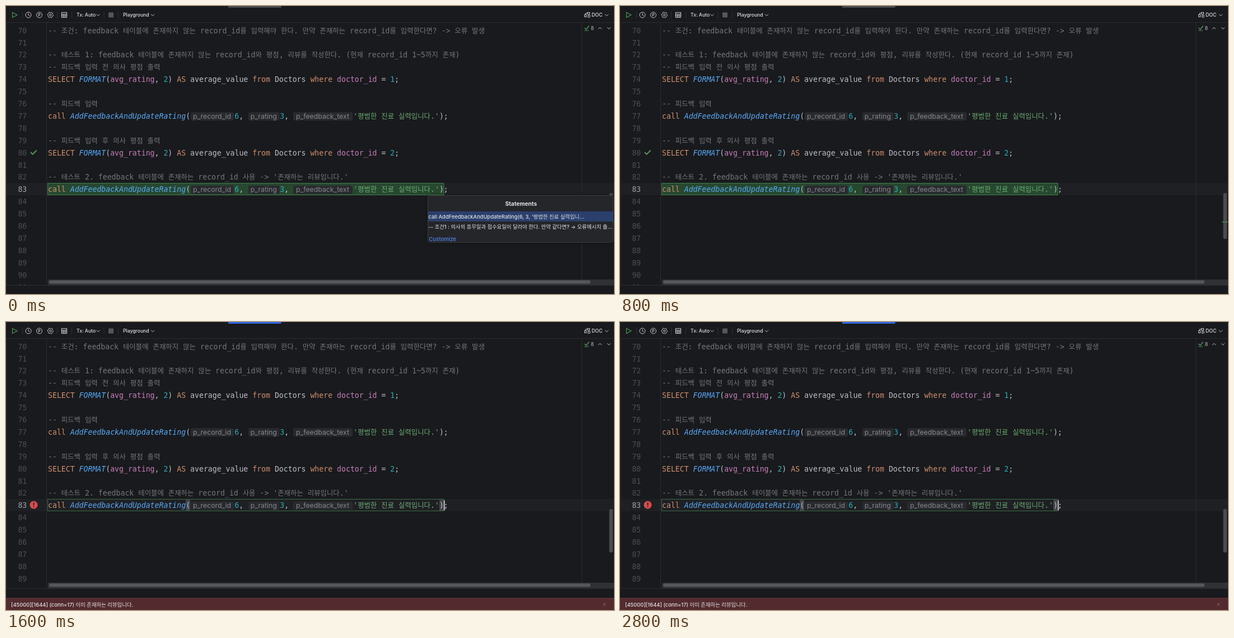
An HTML page with a canvas that plays this animation: 1086x516 px, repeating every 2880 ms.

```html
<!DOCTYPE html>
<html lang="ko">
<head>
<meta charset="utf-8">
<title>SQL editor</title>
<style>
html, body { margin: 0; width: 100%; height: 100%; overflow: hidden; background: #191a1d; }
canvas { display: block; width: 1086px; height: 516px; }
</style>
</head>
<body>
<canvas id="stage"></canvas>
<script>
const W = 1086, H = 516, LOOP = 2880;
const POPUP_END = 720, FAIL_AT = 880, BLINK = 800;
const ROW = 21.9, FIRST_Y = 44, CODE_X = 75;

const canvas = document.getElementById('stage');
const ctx = canvas.getContext('2d');
const ratio = window.devicePixelRatio || 1;
canvas.width = W * ratio;
canvas.height = H * ratio;

const MONO = '13.2px "DejaVu Sans Mono", monospace';
const HANGUL = '12.4px "Noto Sans CJK KR", "Noto Sans CJK", sans-serif';
const ui = (size, weight = 400) => `${weight} ${size}px Inter, "Noto Sans CJK KR", "Noto Sans CJK", sans-serif`;

const C = {
  bg: '#191a1d', line: '#2b2c30', icon: '#c6c8ce', comment: '#73767d', text: '#bcbec4',
  key: '#cf8e6d', fn: '#56a8f5', col: '#c77dbb', num: '#2aacb8', str: '#6aab73',
  green: '#57965c', red: '#d64d4d', ui: '#dfe1e5'
};

function box(x, y, w, h, color) {
  ctx.fillStyle = color;
  ctx.fillRect(x, y, w, h);
}

function round(x, y, w, h, r, color) {
  ctx.fillStyle = color;
  ctx.beginPath();
  ctx.roundRect(x, y, w, h, r);
  ctx.fill();
}

function stroke(points, color, width = 1, closed = false) {
  ctx.strokeStyle = color;
  ctx.lineWidth = width;
  ctx.beginPath();
  points.forEach(([x, y]) => ctx.lineTo(x, y));
  if (closed) ctx.closePath();
  ctx.stroke();
}

function ring(x, y, r, color = C.icon) {
  ctx.strokeStyle = color;
  ctx.lineWidth = 1;
  ctx.beginPath();
  ctx.arc(x, y, r, 0, Math.PI * 2);
  ctx.stroke();
}

function label(str, x, y, font, color, align = 'left') {
  ctx.font = font;
  ctx.fillStyle = color;
  ctx.textAlign = align;
  ctx.fillText(str, x, y);
  ctx.textAlign = 'left';
}

function chevron(x, y, dir = 1) {
  stroke([[x - 3, y - 1.5 * dir], [x, y + 1.5 * dir], [x + 3, y - 1.5 * dir]], C.icon);
}

// Writes mixed Latin and Hangul, returns the end position.
function write(str, x, y, color, italic) {
  for (const run of str.match(/[가-힣]+|[^가-힣]+/g)) {
    const font = /[가-힣]/.test(run) ? HANGUL : MONO;
    label(run, x, y, (italic ? 'italic ' : '') + font, color);
    x += ctx.measureText(run).width;
  }
  return x;
}

const rowY = n => FIRST_Y + (n - 70) * ROW;
const baseline = n => rowY(n) + 4.6;

function code(n, parts) {
  let x = CODE_X;
  for (const [str, kind] of parts) x = write(str, x, baseline(n), C[kind], kind === 'fn');
}

function select(n, id) {
  code(n, [['SELECT ', 'key'], ['FORMAT', 'fn'], ['(', 'text'], ['avg_rating', 'col'], [', ', 'text'],
    ['2', 'num'], [') ', 'text'], ['AS ', 'key'], ['average_value ', 'text'], ['from ', 'key'],
    ['Doctors ', 'text'], ['where ', 'key'], ['doctor_id', 'col'], [' = ', 'text'], [id, 'num'], [';', 'text']]);
}

function hint(str, x, w, n) {
  round(x, rowY(n) - 7, w, 15, 3, '#292a2e');
  label(str, x + w / 2 - 0.5, rowY(n) + 4.2, ui(12.3), '#83868d', 'center');
}

function call(n) {
  const y = baseline(n);
  code(n, [['call ', 'key'], ['AddFeedbackAndUpdateRating', 'fn'], ['(', 'text']]);
  hint('p_record_id', 330, 77, n);
  hint('p_rating', 433, 55.5, n);
  hint('p_feedback_text', 513, 106, n);
  write(',', write('6', 408.2, y, C.num), y, C.text);
  write(',', write('3', 489.2, y, C.num), y, C.text);
  write(');', write("'평범한 진료 실력입니다.'", 620.2, y, C.str), y, C.text);
}

const comments = {
  70: '-- 조건: feedback 테이블에 존재하지 않는 record_id를 입력해야 한다. 만약 존재하는 record_id를 입력한다면? -> 오류 발생',
  72: '-- 테스트 1: feedback 테이블에 존재하지 않는 record_id와 평점, 리뷰를 작성한다. (현재 record_id 1~5까지 존재)',
  73: '-- 피드백 입력 전 의사 평점 출력',
  76: '-- 피드백 입력',
  79: '-- 피드백 입력 후 의사 평점 출력',
  82: "-- 테스트 2. feedback 테이블에 존재하는 record_id 사용 -> '존재하는 리뷰입니다.'"
};

function gear(x, y) {
  const pts = [];
  for (let i = 0; i < 24; i++) {
    const a = i * Math.PI / 12, r = i % 4 < 2 ? 5.2 : 4.2;
    pts.push([x + r * Math.cos(a), y + r * Math.sin(a)]);
  }
  stroke(pts, C.icon, 1, true);
  ring(x, y, 1.7);
}

function toolbar(failed) {
  box(397, 0, 94.5, 3, failed ? '#3068e0' : '#4b4c50');
  box(0, 29, W, 1, C.line);
  stroke([[11.5, 11.5], [20, 16], [11.5, 20.5]], '#4d9a58', 1.1, true);
  ring(40, 16, 5);
  stroke([[40, 12.8], [40, 16.3], [42.5, 17.5]], C.icon);
  ring(59.5, 16, 5);
  label('P', 59.6, 18.6, ui(7, 600), C.icon, 'center');
  gear(79.3, 16);
  ctx.strokeStyle = C.icon;
  ctx.lineWidth = 1;
  ctx.strokeRect(99.5, 11.5, 9, 9);
  for (const y of [14.5, 17.5]) stroke([[98.5, y], [109.5, y]], C.icon);
  for (const x of [102.5, 105.5]) stroke([[x, 14.5], [x, 20.5]], C.icon);
  for (const x of [29, 91, 117, 174.5, 200]) box(x, 10, 1, 12, '#303136');
  label('Tx: Auto', 126, 19.2, ui(8.6, 500), C.ui);
  chevron(164.5, 16.2);
  round(183, 11.5, 9, 9, 1, '#55575c');
  label('Playground', 209, 19.2, ui(8.6, 500), C.ui);
  chevron(262, 16.2);
  ctx.strokeRect(1033.5, 15.5, 3, 4);
  ctx.strokeRect(1039.5, 16.5, 3.5, 3.5);
  ctx.strokeRect(1038.5, 11.5, 4, 3);
  stroke([[1035, 15], [1035, 13], [1038, 13]], C.icon);
  label('DOC', 1046, 19.2, ui(8.8, 500), C.ui);
  chevron(1073, 16.2);
}

function inspections() {
  stroke([[1033.5, 39], [1036.5, 42], [1041.5, 35.5]], C.green, 1.4);
  stroke([[1033, 44.5], [1035, 43.5], [1037, 44.5], [1039, 43.5], [1041, 44.5]], C.green);
  label('8', 1044.5, 43, ui(9.2), '#b4b6bb');
  chevron(1061, 39.8, -1);
  chevron(1077, 39.8);
}

function popup() {
  ctx.save();
  ctx.shadowColor = 'rgba(0,0,0,.45)';
  ctx.shadowBlur = 6;
  round(754, 339.5, 331, 84, 4, '#25262a');
  ctx.restore();
  ctx.strokeStyle = '#3b3d42';
  ctx.lineWidth = 1;
  ctx.beginPath();
  ctx.roundRect(753.5, 339.5, 331, 84, 4);
  ctx.stroke();
  label('Statements', 920, 358, ui(10.1, 700), C.ui, 'center');
  box(754, 368, 330, 18, '#2a3f6c');
  label("call AddFeedbackAndUpdateRating(6, 3, '평범한 진료 실력입니...", 754.5, 380.7, ui(9.4, 500), C.ui);
  // The zero-width space keeps "->" from becoming an arrow ligature.
  label('-- 조건1 : 의사의 휴무일과 접수요일이 달라야 한다. 만약 같다면? -\u200b> 오류메시지 출...', 754.5, 398.5, ui(9.35, 500), C.ui);
  label('Customize', 755.5, 420.5, ui(9.6, 500), '#4f86ee');
}

function errorBar() {
  box(0, 494.5, W, 21.5, '#532b2e');
  box(0, 494.5, W, 1, '#63363a');
  label('[45000][1644] (conn=17) 이미 존재하는 리뷰입니다.', 9, 509.7, ui(9.4, 500), C.ui);
  stroke([[1066.5, 503.5], [1071.5, 508.5]], '#83676a');
  stroke([[1071.5, 503.5], [1066.5, 508.5]], '#83676a');
}

function editor(failed, bottom) {
  ctx.save();
  ctx.beginPath();
  ctx.rect(0, 30, W, bottom - 30);
  ctx.clip();
  box(0, 317.5, W, 21.5, '#1f2024');
  box(72, 30, 1, H, C.line);
  box(1028, 30, 1, H, C.line);
  for (let n = 70; n <= 91; n++) {
    label(n, 37.3, baseline(n), MONO, n === 83 ? '#a1a3ab' : '#4b4e55', 'right');
  }

  if (!failed) box(75, 318, 707, 20.5, '#27482f');
  ctx.strokeStyle = failed ? '#3a6b45' : '#3f7e4c';
  ctx.lineWidth = 1;
  ctx.strokeRect(74.5, 317.5, 707.5, 21);
  if (failed) {
    box(321, 318.5, 8, 19.5, '#43454a');
    box(774, 318.5, 8, 19.5, '#43454a');
  }

  for (const n in comments) write(comments[n], CODE_X, baseline(+n), C.comment);
  select(74, '1');
  call(77);
  select(80, '2');
  call(83);

  if (failed) {
    ctx.fillStyle = C.red;
    ctx.beginPath();
    ctx.arc(49.5, 327.7, 7, 0, Math.PI * 2);
    ctx.fill();
    box(48.7, 323.5, 1.7, 5, C.bg);
    box(48.7, 330, 1.7, 1.7, C.bg);
  } else {
    stroke([[44, 262], [47.7, 265.7], [54.7, 258.5]], C.green, 2);
  }

  round(1077.5, 335, 6.5, failed ? 78 : 82.5, 3, '#4b4c50');
  if (!failed) box(1075, 386, 11, 1.5, '#4a8a55');
  box(75, bottom - 10, W - 75, 10, '#303135');
  round(77, bottom - 8.5, 967, 6, 3, '#56575b');
  ctx.restore();
  box(0, bottom, W, 1, C.line);
  box(0, 30, 1, bottom - 30, C.line);
}

function draw(t) {
  const failed = t >= FAIL_AT;
  ctx.setTransform(ratio, 0, 0, ratio, 0, 0);
  ctx.textBaseline = 'alphabetic';
  box(0, 0, W, H, C.bg);
  editor(failed, failed ? 477 : 500);
  toolbar(failed);
  inspections();
  if (t < POPUP_END) popup();
  if (failed) {
    errorBar();
    if (Math.floor((t - FAIL_AT) / BLINK) % 2 === 0) box(782, 319.5, 1.6, 18, '#d6d8dd');
  }
}

const start = performance.now();
function tick() {
  draw((performance.now() - start) % LOOP);
  requestAnimationFrame(tick);
}
tick();
</script>
</body>
</html>
```
